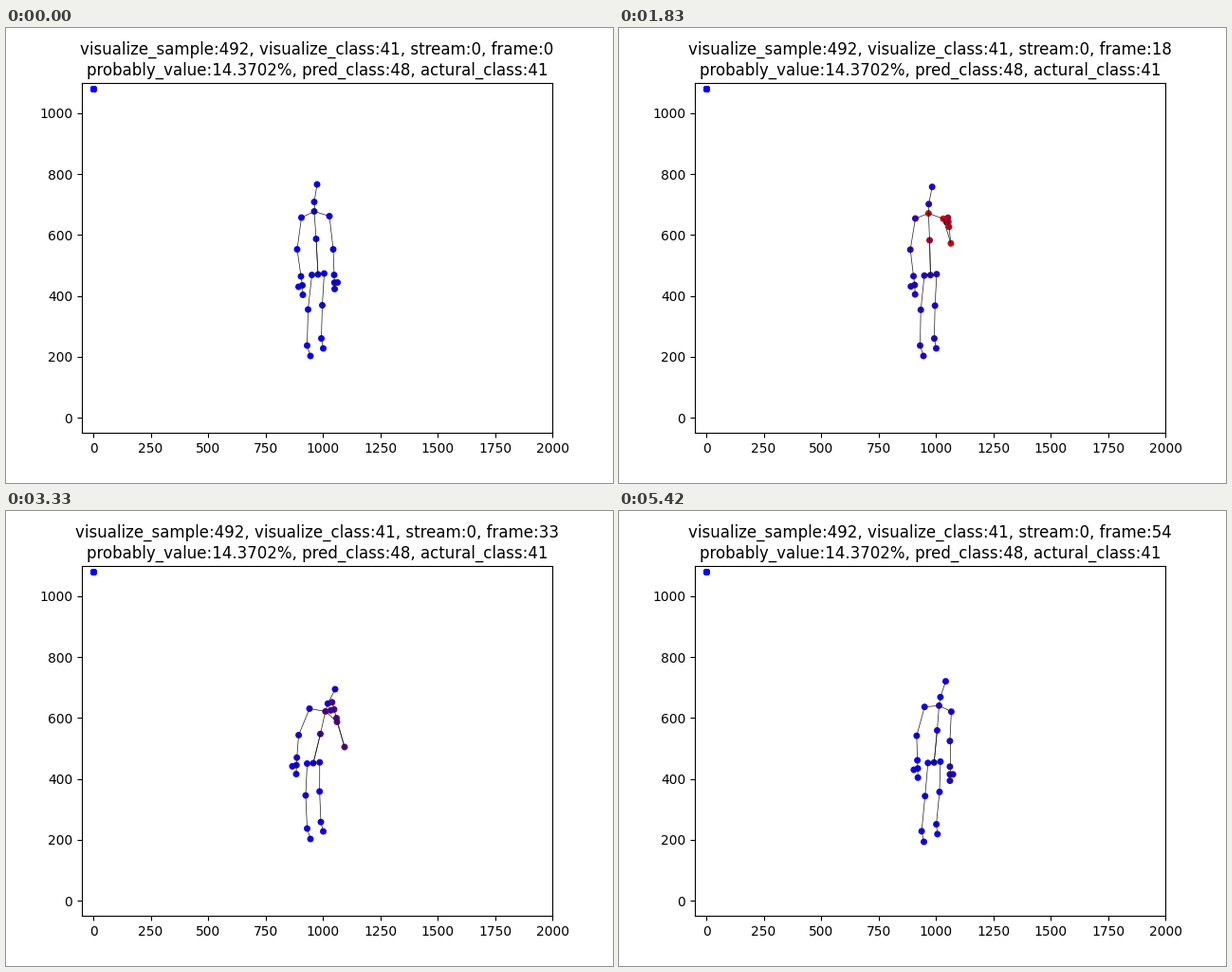
Recreate the animation shown at these times as a matplotlib script. Size 640x480 px, loop 5510 ms.

```python
import numpy as np
import matplotlib.pyplot as plt
from matplotlib.animation import FuncAnimation
from matplotlib.collections import LineCollection

STEP_MS, STEPS = 29, 190
POSES = 55

# Standing pose in stage pixels.
SPINE = np.array([(329, 260), (327, 222.5), (325, 193.5), (325, 183.5), (328, 165)])
REST_ARM = np.array([(311.5, 200), (307, 233.5), (311, 262),
                     (312.5, 271.5), (313, 281.5), (308.5, 273)])
LIFT_SHOULDER = np.array([341, 198.5])
LEGS = np.array([(322.5, 260.5), (318.5, 297), (317.5, 335), (321, 346),
                 (335.5, 259), (333.5, 292.5), (332.5, 327.5), (334.5, 338)])

# Upper arm and forearm of the lifted arm, as vectors at a few poses.
ARM_KEYS = [0, 8, 18, 27, 33, 46, 54]
UPPER_X = [4, 4, 8, 15.5, 8, 0, -1.5]
UPPER_Y = [35, 32.5, 26, 19, 26.5, 17, 31]
FORE_X = [1, 1.5, -2, -14.5, -8.5, -1.5, 0]
FORE_Y = [27, 27, -17.5, -31, -30.5, -41.5, 27]

# Joint order: spine 0-4, resting arm 5-10, lifted arm 11-16, legs 17-24.
CHAINS = [(0, 1, 2, 3, 4), (1, 0),
          (2, 5, 6, 7, 8, 9), (8, 10),
          (2, 11, 12, 13, 14, 15), (14, 16),
          (0, 17, 18, 19, 20), (0, 21, 22, 23, 24)]
BONES = [pair for chain in CHAINS for pair in zip(chain, chain[1:])]

# How strongly each joint takes part in the action.
GAIN = np.full(25, 0.12)
GAIN[[1, 2, 5]] = 0.68, 1, 0.2
GAIN[11:15] = 0.97
GAIN[15:17] = 0.75

# Every sixth tick of the 12 per second clock repeats the pose before it.
index = np.arange(POSES)
STARTS = np.round((index + (index + 2) // 5) * 25 / 3) * 10


def smooth(t, start, end):
    u = np.clip((t - start) / (end - start), 0, 1)
    return u * u * (3 - 2 * u)


def shift(points, heights, dx, dy):
    y = points[:, 1]
    return np.column_stack([np.interp(y, heights, dx), np.interp(y, heights, dy)])


def lifted_arm(shoulder, pose):
    upper = np.array([np.interp(pose, ARM_KEYS, k) for k in (UPPER_X, UPPER_Y)])
    fore = np.array([np.interp(pose, ARM_KEYS, k) for k in (FORE_X, FORE_Y)])
    side = np.array([fore[1], -fore[0]])
    elbow = shoulder + upper
    wrist = elbow + fore
    hand = wrist + 0.3 * fore
    return [shoulder, elbow, wrist, hand, wrist + 0.55 * fore, hand + 0.12 * side]


def joints(pose):
    bend = smooth(pose, 14, 33) * (1 - 0.45 * smooth(pose, 44, 54))
    step = smooth(pose, 44, 54)

    def lean(points):
        return points + bend * shift(points, [165, 260, 335], [19, -5, 0], [23, 6, 0])

    def sway(points):
        return points + step * shift(points, [295, 345], [6, 0.5], [2, 3])

    resting = REST_ARM + bend * shift(REST_ARM, [200, 275], [8.5, -7], [8.5, -4])
    shoulder = LIFT_SHOULDER + bend * np.array([8, 24]) + step * np.array([5, 0])
    px = np.vstack([sway(lean(SPINE)), sway(resting),
                    lifted_arm(shoulder, pose), sway(lean(LEGS))])
    x = (px[:, 0] - 80) / 496 * 2050 - 50
    y = (427.2 - px[:, 1]) / 369.6 * 1150 - 50
    return np.column_stack([x, y])


def colours(pose):
    pulse = smooth(pose, 0, 18) * (1 - 0.65 * smooth(pose, 25, 34))
    pulse *= 1 - 0.6 * smooth(pose, 33, 48)
    heat = 0.04 + 0.84 * GAIN * pulse
    return np.column_stack([heat, 0 * heat, (1 - heat) ** 1.5])


fig, ax = plt.subplots(figsize=(6.4, 4.8), dpi=100)
ax.set_xlim(-50, 2000)
ax.set_ylim(-50, 1100)
ax.scatter([0] * 25, [1080] * 25, s=16, color="blue")
body = ax.scatter([0] * 25, [0] * 25, s=16)
bones = ax.add_collection(LineCollection([], colors="0.1", linewidths=0.5, zorder=2))


def update(step):
    now = (step + 1) * STEP_MS - 1
    pose = int(np.sum(STARTS <= now)) - 1
    points = joints(pose)
    body.set_offsets(points)
    body.set_color(colours(pose))
    bones.set_segments([points[[a, b]] for a, b in BONES])
    ax.set_title(f"visualize_sample:492, visualize_class:41, stream:0, frame:{pose}\n"
                 "probably_value:14.3702%, pred_class:48, actural_class:41")
    return body, bones


anim = FuncAnimation(fig, update, frames=STEPS, interval=STEP_MS, repeat=True)
plt.show()
```
